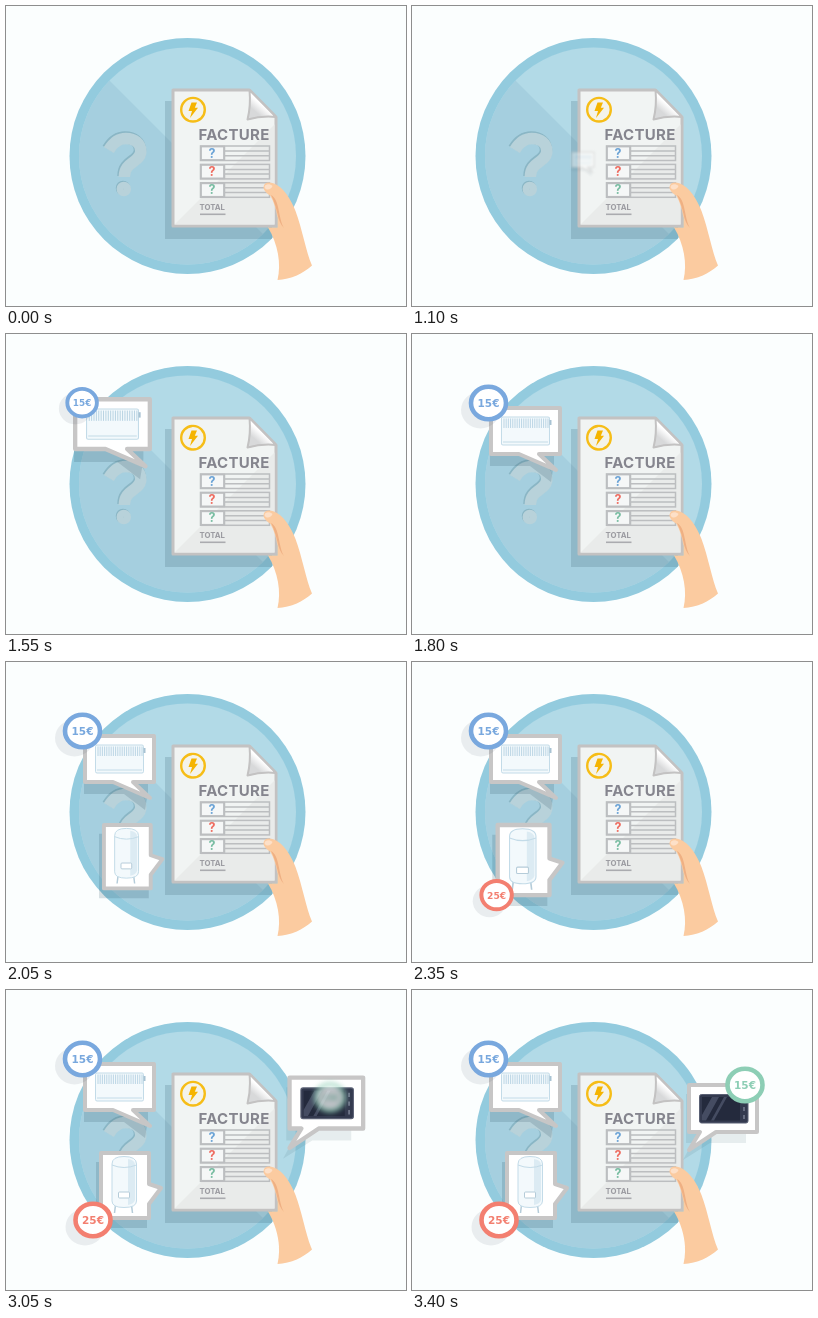
An HTML page that plays this animation: 400x300 px, repeating every 8000 ms.

```html
<!DOCTYPE html>
<html lang="fr">
<head>
<meta charset="utf-8">
<style>
html, body { margin: 0; height: 100%; overflow: hidden; background: #fbfefe; }
svg { display: block; width: 400px; height: 300px; }
text { font: bold 15px Inter, Roboto, sans-serif; fill: #85858e; }
.badge text { font: bold 10.5px "DejaVu Sans", sans-serif; text-anchor: middle; }
.shade { fill: #1d4050; fill-opacity: .16; }
.pale { fill-opacity: .09; }
.box { fill: #fff; stroke: #c7c6c6; stroke-width: 4; stroke-linejoin: round; }
.line { fill: none; stroke: #bcbec0; stroke-width: 1.5; }
.ice { fill: #f3f9fc; stroke: #c3dbe8; stroke-width: 1; }
</style>
</head>
<body>
<svg viewBox="0 0 400 300">
  <defs>
    <clipPath id="disc"><circle cx="181.5" cy="150" r="108.5"/></clipPath>
    <linearGradient id="fold" x1=".75" y1=".2" x2=".3" y2=".75">
      <stop offset="0" stop-color="#fff"/><stop offset=".55" stop-color="#fff"/><stop offset="1" stop-color="#d8d9da"/>
    </linearGradient>
    <g id="ask">
      <path d="M102 143C107 134.500 113 131.500 119 131.500C128 131.500 134 136.500 134 144C134 156 117.500 154 117.500 170"/>
      <circle cx="117" cy="182" r="3.5" stroke-width="7.5"/>
    </g>
  </defs>

  <circle cx="181.5" cy="150" r="118" fill="#93cbde"/>
  <g clip-path="url(#disc)">
    <rect x="60" y="30" width="250" height="240" fill="#b2dae7"/>
    <path d="M60 31L300 271H60Z" fill="#a5cfdf"/>
  </g>
  <g fill="none" stroke-width="12.500">
    <use href="#ask" stroke="#8ab6c5"/>
    <use href="#ask" stroke="#b8d2da" transform="translate(.8 1)" stroke-width="11.500"/>
  </g>

  <path class="shade" d="M159 95H240V200H266V233H159Z"/>
  <path d="M167 84H243.500L270 111V220H167Z" fill="#f1f4f3" stroke="#c3c2c2" stroke-width="3" stroke-linejoin="round"/>
  <path d="M168.500 218.500L268.500 118.500V218.500Z" fill="#e9ebea"/>
  <path d="M243.500 84L270 111Q256 109.500 241.500 113.500Q245 100 243.500 84Z" fill="url(#fold)" stroke="#c3c2c2" stroke-width="2" stroke-linejoin="round"/>
  <circle cx="187" cy="103.700" r="11.800" fill="#f4f3ea" stroke="#f6bd17" stroke-width="2.400"/>
  <path d="M185.500 96.500H191L188.800 101.800H192L184 112L186 105H182.500Z" fill="#f5b400"/>
  <text x="192.500" y="134" letter-spacing=".3">FACTURE</text>
  <g id="rows"></g>
  <text x="193.500" y="204" style="font-size:7.8px;fill:#9b9ba1">TOTAL</text>
  <path d="M194 208.300H219.500" stroke="#aaabaf" stroke-width="1.600"/>

  <path d="M257.500 181C258 176 263 175.500 268 177.500C277 181 285 193 289.500 205C296 222 300 246 306 259.500C298 267 285 273.500 271.500 274C275.500 258 272 238 262 221.500H271.500V212C270 203 268 196 264.500 190C261 187 257.500 185 257.500 181Z" fill="#fbcba0"/>
  <path d="M265 189C274 194 272 212 278 222C275 219 272.500 214 271.500 208C270 201 268 195 265 189Z" fill="#efb083"/>
  <path d="M258.500 181C259 177.500 264 177.500 266.500 180C265 184 260 185 258.500 181Z" fill="#fde0c8"/>

  <g class="bubble">
    <path class="shade" d="M78 83H142V130L139 148L118 132H78Z"/>
    <path class="box" d="M79 74H148V120H127L144 136L107 120H79Z"/>
    <rect class="ice" x="89.500" y="83" width="48" height="28" rx="1.500"/>
    <path id="fins" fill="none" stroke="#b6d2e2" stroke-width=".9"/>
    <path d="M91 108H136" class="ice"/>
    <path d="M138.500 86V91" stroke="#a9c3d3" stroke-width="2"/>
  </g>
  <g class="bubble">
    <path class="shade" d="M90 172H141V238H90Z"/>
    <path class="box" d="M95 163H143V194L155 198L143 214V228H95Z"/>
    <path d="M109.500 215L108.500 223M125.500 215L126.500 223" stroke="#b5ccd9" stroke-width="1.500"/>
    <path class="ice" d="M106 174Q106 166.500 118 166.500Q130.500 166.500 130.500 174V211Q130.500 217.500 118 217.500Q106 217.500 106 211Z"/>
    <path d="M122 169Q129 170 129 175V210Q128 214 122 215Z" fill="#dcebf3"/>
    <path d="M106 175Q118 180 130.500 175" fill="none" stroke="#c3dbe8"/>
    <rect x="112.500" y="202" width="11" height="6" rx="1" fill="#fff" stroke="#b5ccd9"/>
  </g>
  <g class="bubble">
    <path class="shade pale" d="M274 104H334V153H298L271 170L280 153H274Z"/>
    <path class="box" d="M277 95H345V142H304L277 160L288 142H277Z"/>
    <rect x="287.500" y="104.500" width="48.500" height="28.500" rx="2" fill="#343a4f" stroke="#5a6074"/>
    <rect x="290" y="107" width="38" height="23.500" fill="#242a3d"/>
    <path d="M300 107H307L294 130.500H290V125ZM312 107H315L302 130.500H299Z" fill="#454c62"/>
    <path d="M332 109V113M332 117V121M332 125V129" stroke="#777e91" stroke-width="1.500"/>
  </g>
  <g id="badges"></g>
</svg>
<script>
const $ = s => document.querySelector(s);
const clamp = x => Math.max(0, Math.min(1, x));

$('#rows').innerHTML = ['#6ba3d6', '#ee6c60', '#78bda2'].map((c, i) => `
  <g transform="translate(0 ${i * 18.4})">
    <rect class="line" x="194.500" y="140" width="69" height="14.500"/>
    <path class="line" d="M218.500 140V154.500M218.500 145H263.500M218.500 149.700H263.500"/>
    <rect x="195" y="140.500" width="23" height="13.500" fill="#f5f7f7" stroke="#bcbec0" stroke-width="1.800"/>
    <text x="202.500" y="151.500" style="font-size:12.5px;fill:${c}">?</text>
  </g>`).join('');

let fins = '';
for (let x = 92; x < 137; x += 2.2) fins += `M${x} 84.500V94`;
$('#fins').setAttribute('d', fins);

// start time, start point, resting centre, badge centre
const items = [
  { t0: 1090, from: [177, 160], to: [112, 97], badge: [76.5, 69], color: '#79a8de', label: '15€' },
  { t0: 1870, from: [190, 170], to: [123, 191], badge: [87, 230], color: '#f37f70', label: '25€' },
  { t0: 2650, from: [226, 168], to: [311, 118], badge: [333, 95], color: '#8dceb5', label: '15€' }
];

$('#badges').innerHTML = items.map((b, i) => `
  <g class="badge">
    ${i < 2 ? '<ellipse cx="-8" cy="7" rx="19.500" ry="18.500" fill="#1d3040" fill-opacity=".08"/>' : ''}
    <ellipse rx="17.500" ry="16.300" fill="#fff" stroke="${b.color}" stroke-width="4.600"/>
    <text y="4" style="fill:${b.color}">${b.label}</text>
  </g>`).join('');

const bubbles = document.querySelectorAll('.bubble');
const badges = document.querySelectorAll('.badge');
const mix = (a, b, k) => a.map((v, i) => v + (b[i] - v) * k);

// shoots out past the goal, holds, then settles
function travel(t) {
  if (t < 400) return 1.11 * (1 - (1 - t / 400) ** 3.4);
  const u = clamp((t - 450) / 270);
  return 1.11 - .11 * u * u * (3 - 2 * u);
}

const outBack = u => 1 + 2.7 * (u - 1) ** 3 + 1.7 * (u - 1) ** 2;

function pose(el, pos, scale, centre, alpha, blur) {
  el.setAttribute('transform', `translate(${pos}) scale(${scale}) translate(${-centre[0]} ${-centre[1]})`);
  el.style.opacity = clamp(alpha);
  el.style.filter = blur > .05 ? `blur(${blur}px)` : 'none';
}

const badgeDelay = 388;

function draw(now) {
  const time = now % 8000;
  items.forEach((b, i) => {
    const t = time - b.t0, u = clamp((t - badgeDelay) / 190);
    bubbles[i].style.display = t < 0 ? 'none' : '';
    badges[i].style.display = t < badgeDelay ? 'none' : '';
    if (t < 0) return;
    const k = travel(t);
    pose(bubbles[i], mix(b.from, b.to, k), .25 + .75 * k, b.to, .3 + t / 90, 2.6 * (1 - t / 230));
    if (t < badgeDelay) return;
    const centre = mix(b.from, b.to, 1.11), size = .82 + .18 * clamp((t - 440) / 150);
    pose(badges[i], mix(centre, b.badge, outBack(u)), size, [0, 0], .65 + u, 3.5 * (1 - u * 2.3));
  });
}

const start = performance.now();
function tick() {
  draw(performance.now() - start);
  requestAnimationFrame(tick);
}
tick();
</script>
</body>
</html>
```
